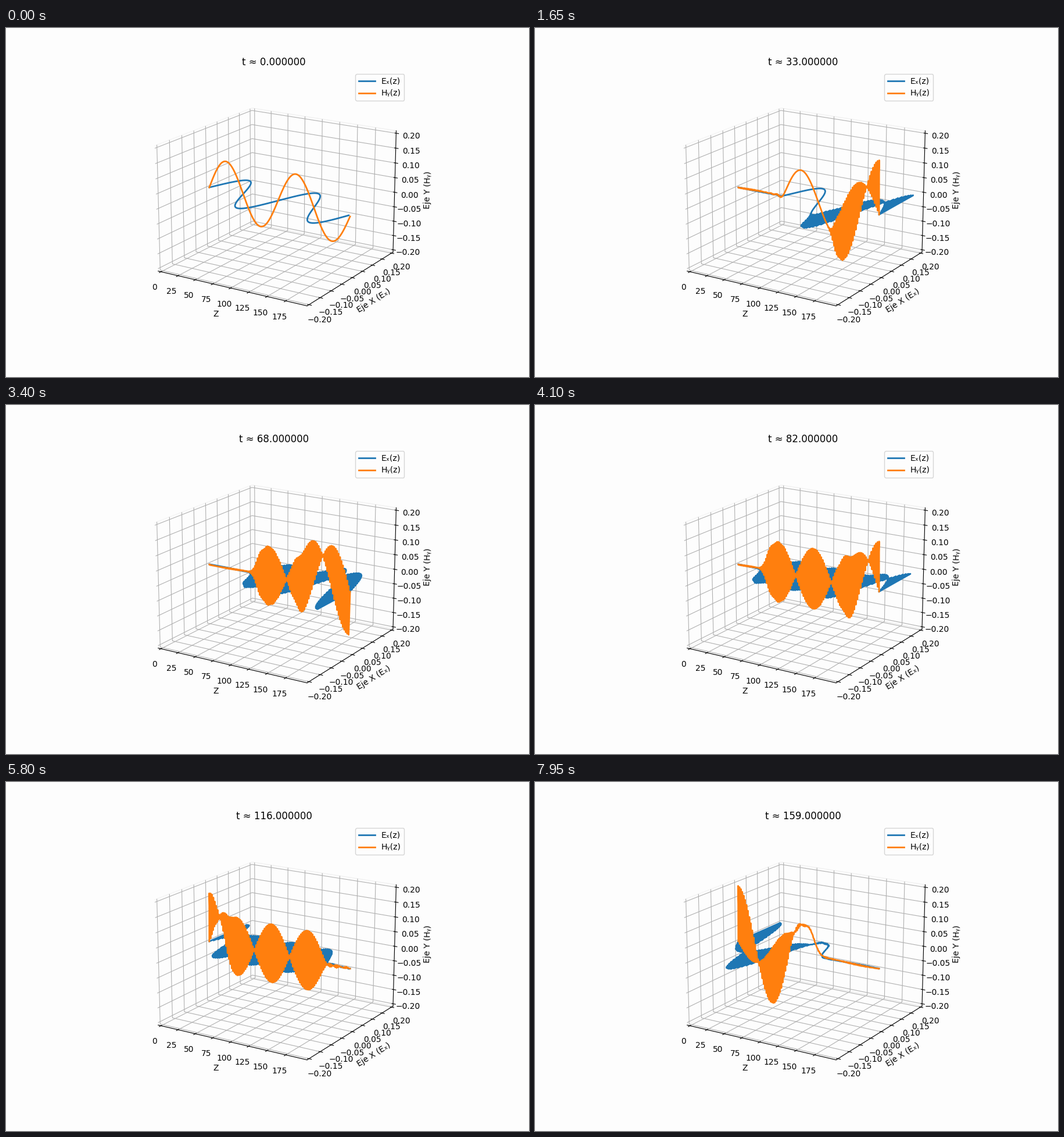
Animation of 900 by 600 pixels, one loop 8000 ms. Source, as a matplotlib script:

```python
import numpy as np
import matplotlib.pyplot as plt
from matplotlib.animation import FuncAnimation

CELLS = 200
FRAMES = 160
STEPS = 2          # field updates per frame
COURANT = 0.5
AMP = 0.1
LIMIT = 0.2
PAPER = "#fdfdfd"

z = np.arange(CELLS)


def update_field(target, other):
    """Central-difference update with both ends held at zero."""
    target[1:-1] -= COURANT * (other[2:] - other[:-2])
    target[0] = target[-1] = 0


def simulate():
    ex = AMP * np.sin(4 * np.pi * z / CELLS)
    hy = ex.copy()
    states = []
    for _ in range(FRAMES):
        states.append((ex.copy(), hy.copy()))
        for _ in range(STEPS):
            update_field(ex, hy)
            update_field(hy, ex)
    return states


def padded(low, high):
    pad = (high - low) / 48
    return low - pad, high + pad


states = simulate()

fig = plt.figure(figsize=(9, 6), dpi=100, facecolor=PAPER)
ax = fig.add_subplot(projection="3d", facecolor=PAPER)
ax.view_init(elev=18, azim=-58)

flat = np.zeros(CELLS)
e_line, = ax.plot(z, states[0][0], flat, lw=2, color="#1f77b4", label="Eₓ(z)")
h_line, = ax.plot(z, flat, states[0][1], lw=2, color="#ff7f0e", label="Hᵧ(z)")

ax.set_xlim(*padded(0, CELLS - 1))
ax.set_ylim(*padded(-LIMIT, LIMIT))
ax.set_zlim(*padded(-LIMIT, LIMIT))
ax.set_xticks(range(0, CELLS, 25))
ax.set_xlabel("Z")
ax.set_ylabel("Eje X (Eₓ)")
ax.set_zlabel("Eje Y (Hᵧ)")
for axis, edge in ((ax.xaxis, "0.96"), (ax.yaxis, "0.945"), (ax.zaxis, "0.925")):
    axis.set_pane_color(PAPER)
    axis.pane.set_edgecolor(edge)
ax.legend(loc="upper right", facecolor=PAPER)
title = ax.set_title("")


def draw(i):
    ex, hy = states[i]
    e_line.set_data_3d(z, ex, flat)
    h_line.set_data_3d(z, flat, hy)
    title.set_text(f"t ≈ {i:.6f}")
    return e_line, h_line, title


anim = FuncAnimation(fig, draw, frames=FRAMES, interval=50, repeat=True)
plt.show()
```
